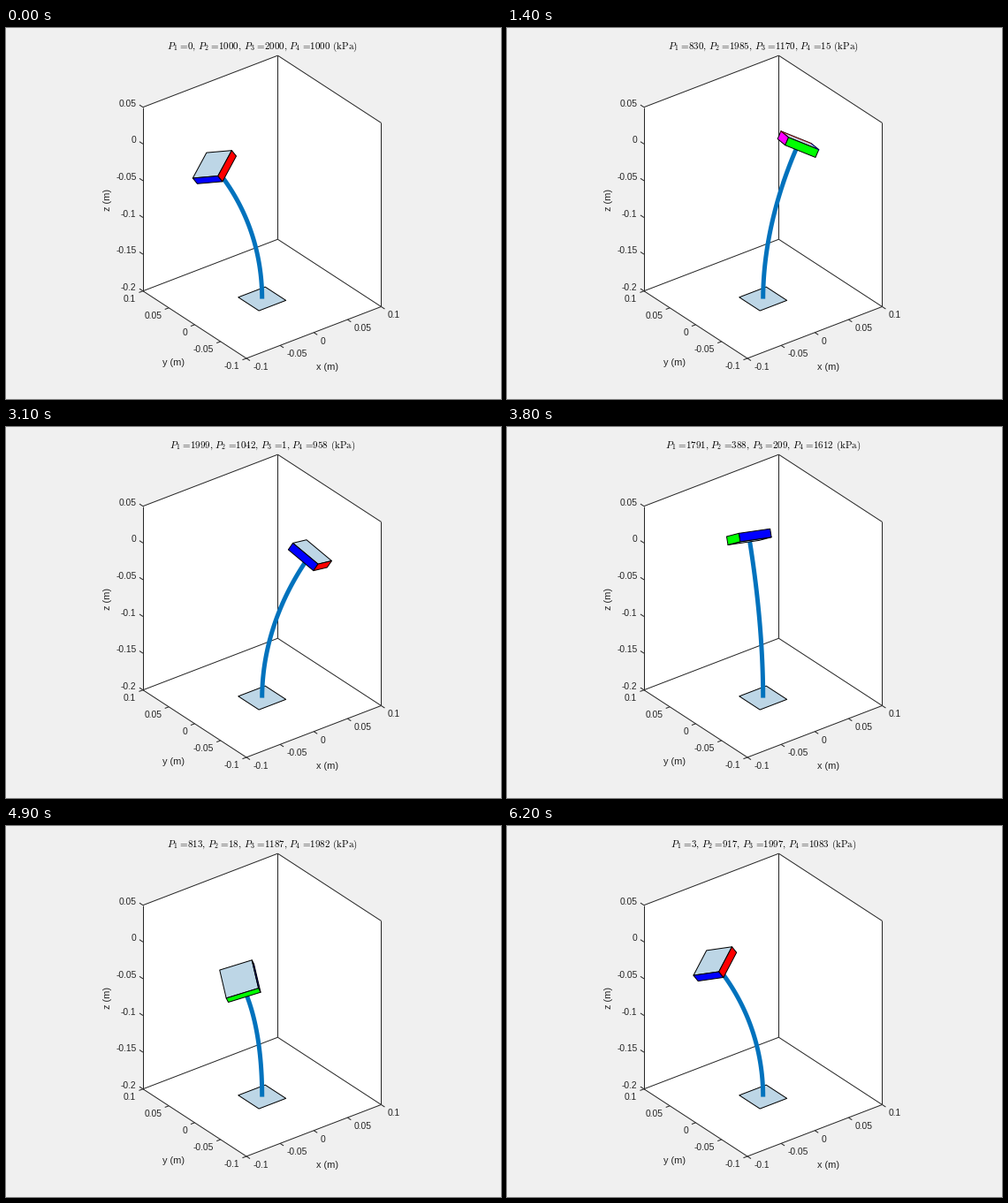
Animation, 560 px wide and 420 px high, one loop 6.3 s. Source, as a matplotlib script:

```python
import numpy as np
import matplotlib
import matplotlib.pyplot as plt
from matplotlib.animation import FuncAnimation
from matplotlib.patches import Polygon

matplotlib.rcParams["mathtext.fontset"] = "cm"
matplotlib.rcParams["font.family"] = "Liberation Sans"

W, H, DPI = 560, 420, 100
PX = 72 / DPI                      # one pixel in points
FRAMES, INTERVAL = 63, 100

# Orthographic camera
AZ, EL = np.radians(-37.5), np.radians(30)
RIGHT = np.array([np.cos(AZ), np.sin(AZ), 0])
UP = np.array([-np.sin(AZ) * np.sin(EL), np.cos(AZ) * np.sin(EL), np.cos(EL)])
TOWARD = np.cross(RIGHT, UP)
SCALE = 961
BASE = np.array([0, 0, -0.2])
BASE_PX = np.array([289.7, 306.6])

# Arm
LENGTH, BEND = 0.1937, 0.583
SIDE, THICK = 0.04, 0.01
TWIST_GAIN = 0.932
SLIVER = 0.02                      # faces turned less than this are edge-on
DARK, PLATE, TUBE = "#262626", "#bdd6e6", "#0072bd"


def project(points):
    rel = np.asarray(points, float) - BASE
    return BASE_PX + SCALE * np.stack([rel @ RIGHT, -(rel @ UP)], axis=-1)


def rot_z(a):
    c, s = np.cos(a), np.sin(a)
    return np.array([[c, -s, 0], [s, c, 0], [0, 0, 1]])


def rot_y(a):
    c, s = np.cos(a), np.sin(a)
    return np.array([[c, 0, s], [0, 1, 0], [-s, 0, c]])


fig = plt.figure(figsize=(W / DPI, H / DPI), dpi=DPI, facecolor="#f0f0f0")
ax = fig.add_axes([0, 0, 1, 1])
ax.set_xlim(0, W)
ax.set_ylim(H, 0)
ax.axis("off")


def segment(p, q):
    ax.plot([p[0], q[0]], [p[1], q[1]], color=DARK, lw=PX, zorder=2,
            solid_capstyle="butt")


def label(x, y, text, size=10.3, **kw):
    return ax.text(x, y, text, fontsize=size * PX, color=DARK, zorder=3, **kw)


def polygon(points, color, z, edge="black"):
    return ax.add_patch(Polygon(points, closed=True, fc=color, ec=edge,
                                lw=PX, joinstyle="round", zorder=z))


def draw_axes():
    lo, hi, bottom, top = -0.1, 0.1, -0.2, 0.05
    left, back, right, front = project(
        [(lo, hi, bottom), (hi, hi, bottom), (hi, lo, bottom), (lo, lo, bottom)])
    left_t, back_t, right_t = project([(lo, hi, top), (hi, hi, top), (hi, lo, top)])
    polygon([left_t, back_t, right_t, right, front, left], "white", 1, "none")
    for p, q in [(left, left_t), (left_t, back_t), (back_t, right_t),
                 (right_t, right), (back, back_t), (back, left), (back, right),
                 (left, front), (front, right)]:
        segment(p, q)

    for v in (-0.1, -0.05, 0, 0.05, 0.1):
        p = project((v, lo, bottom))
        segment(p, p + (4.0, 2.6))
        label(p[0] + 7.3, p[1] + 13, f"{v:g}")
        p = project((lo, v, bottom))
        segment(p, p + (-4.5, 1.7))
        label(p[0] - 8, p[1] + 11.8, f"{v:g}", ha="right")
    for v in (-0.2, -0.15, -0.1, -0.05, 0, 0.05):
        p = project((lo, hi, v))
        segment(p, p + (-4.0, -2.6))
        label(p[0] - 7.5, p[1] - 1, f"{v:g}", ha="right")

    label(363.5, 386.7, "x (m)", 11, ha="center")
    label(189.5, 381.7, "y (m)", 11, ha="center")
    label(120, 194.5, "z (m)", 11, ha="right", va="center", rotation=90)


draw_axes()
h = SIDE / 2
SQUARE = np.array([(-h, -h), (h, -h), (h, h), (-h, h)])
polygon(project([(x, y, BASE[2]) for x, y in SQUARE]), PLATE, 4)

tube, = ax.plot([], [], color=TUBE, lw=5 * PX, zorder=5, solid_capstyle="butt")
title = ax.text(290, 24.2, "", fontsize=11 * PX, color="black", ha="center",
                va="baseline", zorder=3)

# Plate corners: four below, four above
BOX = np.array([(x, y, z) for z in (0, THICK) for x, y in SQUARE])
FACES = [  # corner indices, outward normal, colour
    ((0, 1, 2, 3), (0, 0, -1), PLATE),
    ((4, 5, 6, 7), (0, 0, 1), PLATE),
    ((0, 3, 7, 4), (-1, 0, 0), "#0000ff"),
    ((0, 1, 5, 4), (0, -1, 0), "#ff0000"),
    ((1, 2, 6, 5), (1, 0, 0), "#ff00ff"),
    ((2, 3, 7, 6), (0, 1, 0), "#00ff00"),
]
patches = [polygon(np.zeros((4, 2)), color, 6) for _, _, color in FACES]
rims = [ax.plot([], [], color=color, lw=PX, alpha=0.5, zorder=7)[0]
        for _, _, color in FACES]


def title_text(pressures):
    gap = r"\hspace{0.38}"
    parts = [rf"P_{{{i}}}\hspace{{0.11}}=\hspace{{-0.2}}\mathrm{{{p:.0f}}}"
             for i, p in enumerate(pressures, 1)]
    return "$" + ("{,}" + gap).join(parts) + gap + r"\mathrm{(kPa)}$"


def update(frame):
    t = 0.1 * frame
    c, s = np.cos(t), np.sin(t)
    title.set_text(title_text(1000 + 1000 * np.array([-c, s, c, -s])))

    # Twist about the base, then a constant-curvature bend
    twist = np.arccos(TWIST_GAIN * np.cos(2 * t))
    heading = t - np.radians(225)
    phi = heading + twist

    a = np.linspace(0, BEND, 40)
    radius = LENGTH / BEND
    out = radius * (1 - np.cos(a))
    arc = BASE + np.stack([out * np.cos(phi), out * np.sin(phi),
                           radius * np.sin(a)], axis=-1)
    tube.set_data(*project(arc).T)

    rot = rot_z(phi) @ rot_y(BEND) @ rot_z(-heading)
    corners = project(arc[-1] + BOX @ rot.T)
    grazing = 0 < rot[:, 2] @ TOWARD < 0.14
    for (idx, normal, _), patch, rim in zip(FACES, patches, rims):
        facing = (rot @ normal) @ TOWARD > SLIVER
        patch.set_xy(corners[list(idx)])
        patch.set_visible(bool(facing))
        # tint of the far sides along the upper edge
        rim.set_visible(bool(grazing and not facing and normal[2] == 0))
        edge = corners[[i for i in idx if i > 3]]
        rim.set_data(edge[:, 0], edge[:, 1] + 0.6)
    return [tube, title, *patches, *rims]


anim = FuncAnimation(fig, update, frames=FRAMES, interval=INTERVAL,
                     repeat=True, repeat_delay=0, blit=False)
plt.show()
```
